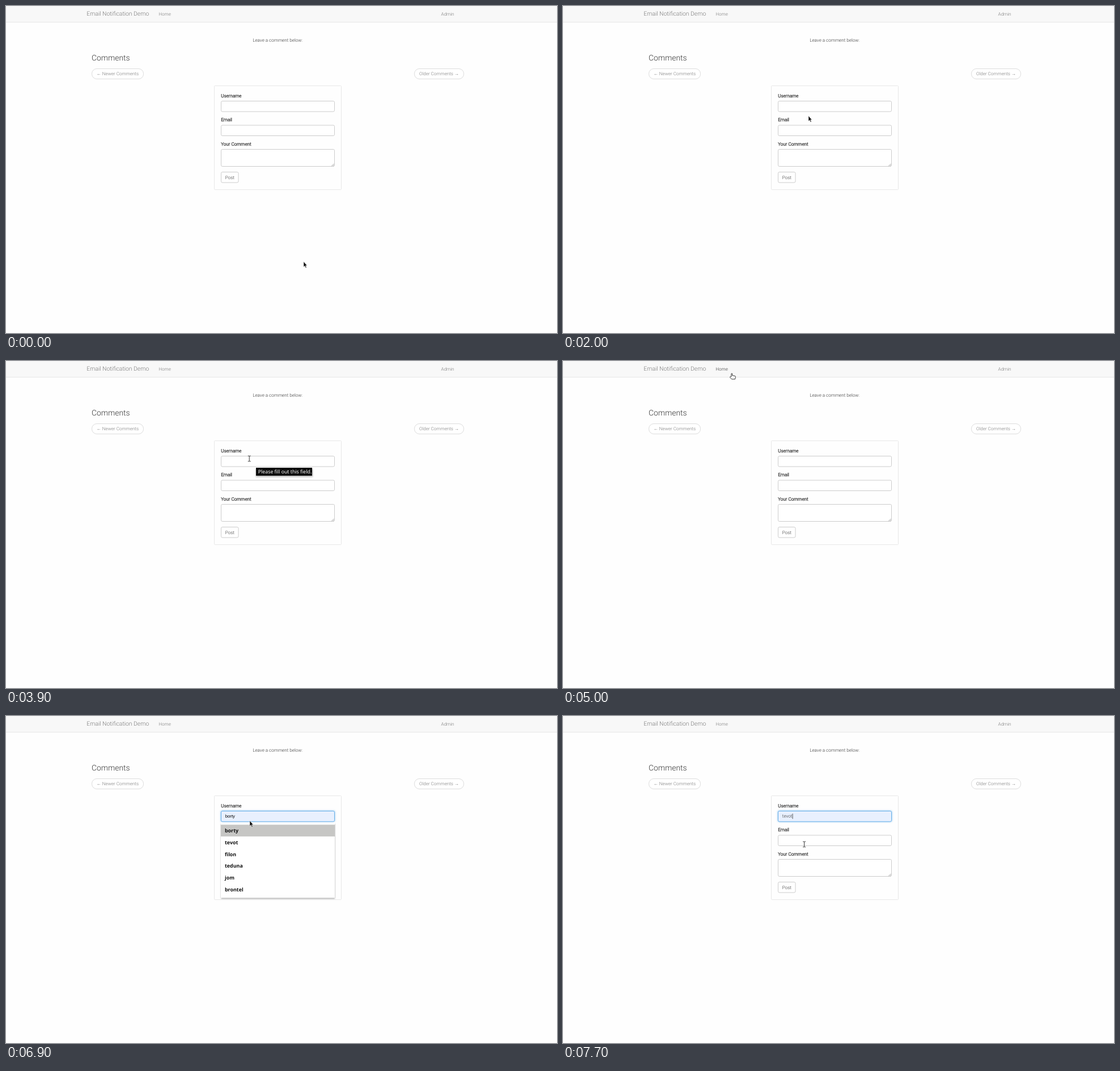
An HTML page that plays this animation: 972 px wide and 576 px high, repeating every 8000 ms.

```html
<!DOCTYPE html>
<html lang="en">
<head>
<meta charset="utf-8">
<title>Email Notification Demo</title>
<style>
html, body { margin: 0; width: 100%; height: 100%; overflow: hidden; background: #fefefe; }
svg { display: block; width: 972px; height: 576px; }
text { font: 300 8.07px Roboto, sans-serif; fill: #333; text-rendering: geometricPrecision; white-space: pre; }
.nav { fill: #777; }
.brand { font-size: 10.37px; }
.head { font-size: 13.83px; }
.label { stroke: #333; stroke-width: .32px; }
.tip { font: 400 8.75px "Noto Sans", "Open Sans", sans-serif; fill: #fff; }
.item { font: 600 8.9px "Noto Sans", "Open Sans", sans-serif; fill: #111; }
.preview { font: 400 7.68px "Liberation Sans", Arial, sans-serif; fill: #000; }
.box { fill: #fff; stroke: #ccc; }
.pill { fill: #fff; stroke: #ddd; }
</style>
</head>
<body>
<svg viewBox="0 0 972 576">
  <defs>
    <filter id="blur" x="-10%" y="-60%" width="120%" height="220%"><feGaussianBlur stdDeviation="1.5"/></filter>
    <filter id="soft" x="-10%" y="-60%" width="120%" height="220%"><feGaussianBlur stdDeviation="1.1"/></filter>
  </defs>
  <rect width="972" height="576" fill="#fefefe"/>
  <rect width="972" height="28" fill="#f8f8f8"/>
  <rect y="28" width="972" height="1" fill="#e7e7e7"/>
  <text class="nav brand" x="142.3" y="17.4">Email Notification Demo</text>
  <text class="nav" id="home" x="269.3" y="16.8">Home</text>
  <text class="nav" x="767.6" y="16.8">Admin</text>

  <text x="435.2" y="63.4">Leave a comment below:</text>
  <text class="head" x="151" y="95.7">Comments</text>
  <rect class="pill" x="151.5" y="110.5" width="91" height="18" rx="8.6"/>
  <text class="nav" x="159.8" y="122.3">← Newer Comments</text>
  <rect class="pill" x="720.5" y="110.5" width="87" height="18" rx="8.6"/>
  <text class="nav" x="729" y="122.3">Older Comments →</text>

  <rect x="367.5" y="140.5" width="224" height="183" rx="1" fill="#fefefe" stroke="#e8e8e8"/>
  <text class="label" x="379.2" y="160.8">Username</text>
  <text class="label" x="379.2" y="203.4">Email</text>
  <text class="label" x="379.2" y="246">Your Comment</text>
  <rect id="glow" x="378.5" y="166.5" width="202" height="20" rx="3" fill="#66afe9" filter="url(#blur)"/>
  <rect class="box" id="user" x="379.5" y="167.5" width="200" height="18.5" rx="2.3"/>
  <rect class="box" x="379.5" y="210" width="200" height="18.5" rx="2.3"/>
  <rect class="box" x="379.5" y="252.5" width="200" height="30" rx="2.3"/>
  <path d="M574.5 282l4-4M577 282l1.5-1.5" stroke="#777" stroke-width=".7"/>
  <rect class="box" x="379.5" y="292.5" width="30.5" height="18.5" rx="2.3"/>
  <text x="386.8" y="304.6">Post</text>

  <text id="value" x="386.8" y="179.3"></text>
  <rect id="caret" y="172" width=".8" height="9.2" fill="#333"/>

  <g id="list">
    <rect x="379.5" y="190" width="200.5" height="131.5" fill="#000" opacity=".45" filter="url(#soft)"/>
    <rect x="379" y="187.5" width="201" height="133" fill="#fff"/>
    <rect id="mark" x="379" width="201" height="20.7" fill="#c6c6c4"/>
  </g>

  <g id="tip">
    <rect x="441" y="190" width="100" height="14" fill="#000" opacity=".3" filter="url(#blur)"/>
    <rect x="441" y="188" width="99" height="14" fill="#0c0c0c"/>
    <text class="tip" x="444.8" y="198">Please fill out this field.</text>
  </g>

  <path id="bubble" d="M0 563.5H96q2.5 0 2.5 2.5V576H0Z" fill="#f4f4f4" stroke="#ddd" stroke-width=".8"/>

  <g id="arrow"><path d="M0 0V9.4L2.1 7.5L3.7 11L5.2 10.3L3.6 6.9H6.2Z" fill="#111" stroke="#fff" stroke-width=".5"/></g>
  <g id="beam"><path d="M-2.4-4.8H-.7L0-4.3L.7-4.8H2.4M0-4.3V4.3M-2.4 4.8H-.7L0 4.3L.7 4.8H2.4" fill="none" stroke="#333" stroke-width="1"/></g>
  <g id="hand"><path d="M-.9 5.6V.6Q-.9-.4 0-.4T.9.6V3.4L5.4 4.1Q6.6 4.4 6.5 5.6L5.8 9.8H-.2L-3.2 6.6Q-3.4 5.2-2.2 5.1Z" fill="#fff" stroke="#222" stroke-width=".9" stroke-linejoin="round"/></g>
</svg>
<script>
const $ = id => document.getElementById(id);
const LOOP = 8000, ROW = 20.75, TOP = 191.5;
const names = ["borty", "tevot", "filon", "teduna", "jom", "brontel"];

// pointer steps: time, x, y, shape
const steps = [
  [0, 525, 450.3, "arrow"], [1300, 523, 445.3, "arrow"],
  [1500, 517, 428, "arrow"], [1600, 496, 376, "arrow"], [1700, 469, 310, "arrow"],
  [1800, 447, 248, "arrow"], [1900, 435, 209, "arrow"], [2000, 433, 193.5, "arrow"],
  [2100, 431, 188, "arrow"], [2200, 433, 182, "beam"], [2300, 434, 180, "beam"],
  [2400, 434, 179.5, "beam"], [3900, 429.2, 172, "beam"],
  [4000, 411, 143, "arrow"], [4100, 375, 98, "arrow"], [4200, 341, 60, "arrow"],
  [4300, 320, 38, "arrow"], [4400, 310.5, 31, "arrow"], [4700, 311, 31.2, "arrow"],
  [4900, 305, 28.5, "arrow"], [5000, 297.8, 22.2, "hand"], [5100, 297, 21.8, "hand"],
  [5200, 304, 29, "arrow"], [5300, 332, 58, "arrow"], [5400, 360, 89.3, "arrow"],
  [5600, 396, 131, "arrow"], [5700, 424, 162, "arrow"], [5800, 433.7, 176.6, "beam"],
  [6700, 433, 179, "beam"], [6800, 432, 182, "beam"], [6900, 430, 184.5, "arrow"],
  [7000, 428, 206, "arrow"], [7100, 426, 226, "arrow"], [7500, 425.6, 226, "beam"]
];

names.forEach((name, i) => {
  const el = document.createElementNS("http://www.w3.org/2000/svg", "text");
  el.setAttribute("class", "item");
  el.setAttribute("x", 386);
  el.setAttribute("y", 205.2 + i * ROW);
  el.textContent = name;
  $("list").append(el);
});

const show = (id, on) => $(id).style.opacity = +on;
const within = (t, a, b) => t >= a && t < b;

function draw(t) {
  const [, x, y, shape] = steps.findLast(s => s[0] <= t);
  for (const id of ["arrow", "beam", "hand"]) {
    show(id, id === shape);
    $(id).setAttribute("transform", `translate(${x} ${y})`);
  }
  $("home").style.fill = within(t, 5000, 5200) ? "#333" : "#777";
  show("tip", within(t, 2900, 4000));
  show("bubble", within(t, 5200, 5600));

  const focus = t >= 6100, row = t < 6900 ? -1 : t < 7100 ? 0 : 1;
  const filled = row >= 0, chosen = t >= 7400;
  show("glow", 0);
  if (focus) show("glow", t < 6200 ? .1 : t < 6400 ? .25 : .6);
  $("user").style.stroke = focus ? "#66afe9" : "#ccc";
  $("user").style.fill = filled ? "#e8f0fe" : "#fff";
  $("value").textContent = filled ? names[row] : "";
  $("value").setAttribute("class", chosen ? "" : "preview");
  show("caret", within(t, 6200, 6900) ? .6 : t >= 7700);
  $("caret").setAttribute("x", chosen ? 387 + $("value").getComputedTextLength() : 386.6);

  show("list", within(t, 6200, 7400));
  show("mark", filled && !chosen);
  $("mark").setAttribute("y", TOP + Math.max(row, 0) * ROW);
}

function tick() {
  draw(Math.floor(performance.now() % LOOP / 100) * 100);
  requestAnimationFrame(tick);
}
tick();
</script>
</body>
</html>
```
